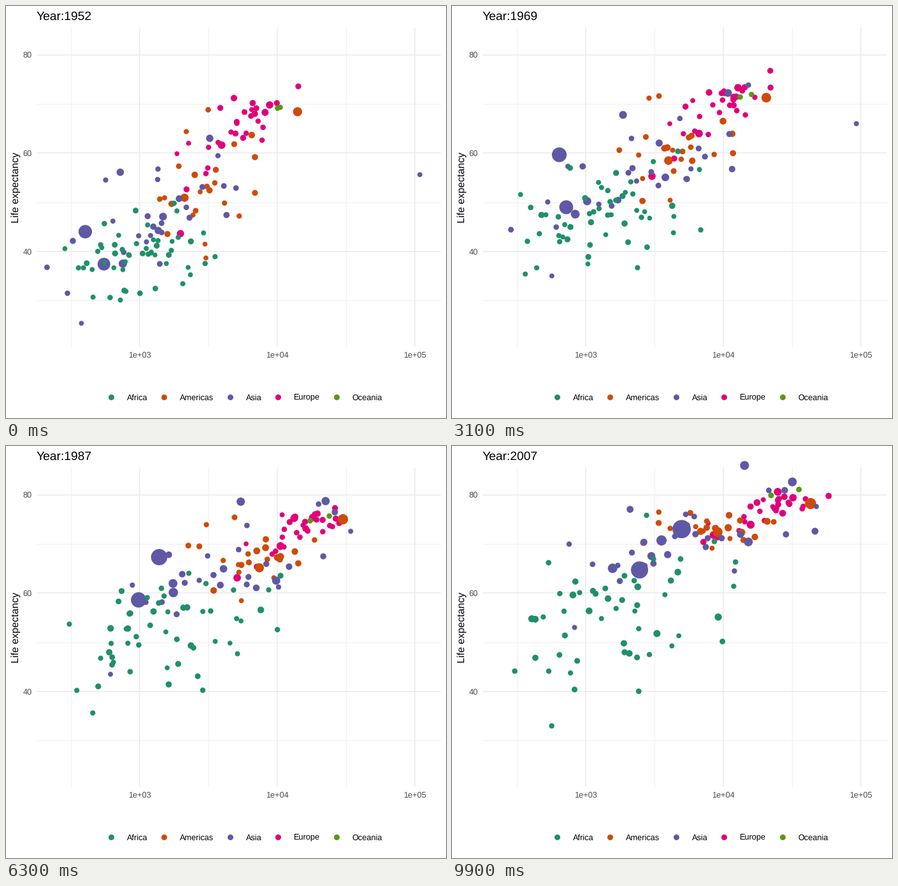
These frames come from a looping animation (691 px wide and 648 px high, 10 s). A matplotlib script:

```python
import numpy as np
import matplotlib.pyplot as plt
from matplotlib.animation import FuncAnimation

W, H, DPI = 691, 648, 64
FRAMES = 100
LEFT, RIGHT, TOP, BOTTOM = 48, 683.5, 34, 536
YEARS = np.linspace(1952, 2007, FRAMES)
SURVEYS = np.arange(1952, 2008, 5)

COLORS = {"Africa": "#1f9067", "Americas": "#ce4b08", "Asia": "#5f58a5",
          "Europe": "#e0007a", "Oceania": "#549a13"}
GROWTH = {"Africa": 3.4, "Americas": 2.1, "Asia": 2.4,
          "Europe": 1.35, "Oceania": 2.2}

plt.rcParams["font.family"] = "Liberation Sans"
plt.rcParams["text.hinting"] = "none"
rng = np.random.default_rng(7)
xs, ys, radii, fills = [], [], [], []


def px(n):
    return n * 72 / DPI


def sx(log_gdp):
    return 210.4 + 216 * (np.asarray(log_gdp) - 3)


def sy(life):
    return 695.2 - 7.7325 * np.asarray(life)


def add(name, pop, years, log_gdp, life):
    """Add a dot moving straight between its yearly positions; pop in millions."""
    xs.append(np.interp(YEARS, years, sx(log_gdp)))
    ys.append(np.interp(YEARS, years, sy(life)))
    people = pop * GROWTH[name] ** ((YEARS - 2007) / 55)
    radii.append(3.6 + 10.8 * np.sqrt(people / 1318))
    fills.append(COLORS[name])


def landmark(name, pop, *points):
    years, gdp, life = zip(*points)
    add(name, pop, years, np.log10(gdp), life)


def trend(start, mid, end):
    """Parabola through three evenly spaced values, at the survey years."""
    u = (SURVEYS - 1952) / 55
    return np.polyval(np.polyfit([0, 0.5, 1], [start, mid, end], 2), u)


def wander(n, keep=0.97):
    """Standard scores of n dots that drift slowly from survey to survey."""
    z = rng.standard_normal(n)
    z = np.clip((z - z.mean()) / z.std(), -2.1, 2.1)
    steps = [z]
    for _ in SURVEYS[1:]:
        z = keep * z + np.sqrt(1 - keep ** 2) * rng.standard_normal(n)
        steps.append(z)
    return np.clip(steps, -2.3, 2.3).T


def crowd(name, n, gdp, gdp_sd, life, life_sd, tie, pop, pop_max):
    """Scatter n dots about a regional trend; tie links wealth and lifespan."""
    wealth, luck = wander(n), wander(n)
    health = tie * wealth + np.sqrt(1 - tie ** 2) * luck
    log_gdp = trend(*gdp) + np.linspace(*gdp_sd, len(SURVEYS)) * wealth
    years = trend(*life) + np.linspace(*life_sd, len(SURVEYS)) * health
    pops = np.minimum(pop * np.exp(1.1 * rng.standard_normal(n)), pop_max)
    for p, g, l in zip(pops, log_gdp, years):
        add(name, p, SURVEYS, g, l)


# Later regions are painted over earlier ones
crowd("Europe", 29, (3.71, 4.13, 4.36), (0.21, 0.22),
      (65.1, 72.7, 77.7), (4.7, 2.7), 0.75, 9, 82)
landmark("Europe", 71, (1952, 1969, 43.6), (1967, 2827, 54.3),
         (1987, 5089, 63.1), (2007, 8458, 71.8))

crowd("Americas", 23, (3.48, 3.77, 3.91), (0.2, 0.22),
      (53, 65.5, 73.3), (8.5, 2.8), 0.5, 9, 108)
landmark("Americas", 190, (1952, 2109, 50.9), (1967, 3430, 57.6),
         (1977, 6660, 61.5), (2007, 9066, 72.4))
landmark("Americas", 301, (1952, 13990, 68.4), (1967, 19530, 70.8),
         (1987, 29884, 75), (2007, 42952, 78.2))

crowd("Asia", 28, (3.08, 3.5, 3.7), (0.36, 0.48),
      (46.2, 61.3, 70.6), (8.3, 6.5), 0.65, 18, 169)
landmark("Asia", 1318, (1952, 400, 44), (1957, 576, 50.5), (1962, 488, 44.5),
         (1967, 613, 58.4), (1977, 741, 64), (1987, 1379, 67.3),
         (2002, 3119, 72), (2007, 4959, 73))
landmark("Asia", 1110, (1952, 547, 37.4), (1977, 813, 54.2),
         (1987, 977, 58.6), (2007, 2452, 64.7))
landmark("Asia", 223, (1952, 750, 37.5), (1967, 762, 46),
         (1987, 1748, 60.1), (2007, 3541, 70.7))
landmark("Asia", 127, (1952, 3217, 63), (1967, 9848, 71.4),
         (1987, 22376, 78.7), (2007, 31656, 82.6))
landmark("Asia", 2.5, (1952, 108382, 55.6), (1967, 80895, 64.6),
         (1972, 109348, 67.7), (1982, 31354, 71.3), (2007, 47307, 77.6))

crowd("Africa", 51, (3, 3.18, 3.22), (0.26, 0.41),
      (39.1, 51.3, 54.9), (4.9, 9), 0.4, 9, 135)
landmark("Africa", 9, (1952, 493, 40), (1987, 848, 44),
         (1992, 737, 23.6), (2007, 863, 46.2))

crowd("Oceania", 2, (4.01, 4.25, 4.47), (0.01, 0.07),
      (69.2, 73.6, 80.7), (0.2, 0.6), 0.9, 9, 20)

xs, ys = np.array(xs), np.array(ys)
sizes = px(2 * np.array(radii)) ** 2

fig = plt.figure(figsize=(W / DPI, H / DPI), dpi=DPI, facecolor="white")
ax = fig.add_axes([0, 0, 1, 1])
ax.set_xlim(0, W)
ax.set_ylim(H, 0)
ax.axis("off")


def grid(decades, lives, width):
    style = dict(color="#ebebeb", linewidth=px(width), zorder=1)
    ax.vlines(sx(decades), TOP, BOTTOM, **style)
    ax.hlines(sy(lives), LEFT, RIGHT, **style)


def text(x, y, s, size, color="black", **kw):
    return ax.text(x, y, s, fontsize=px(size), color=color, va="baseline", **kw)


grid([2.5, 3.5, 4.5], [30, 50, 70], 0.8)
grid([3, 4, 5], [40, 60, 80], 1.55)

for e in (3, 4, 5):
    text(sx(e) - 0.5, 553.3, f"1e+0{e}", 12.8, "#4d4d4d", ha="center")
for v in (40, 60, 80):
    text(41, sy(v) + 4.6, str(v), 12.8, "#4d4d4d", ha="right")
text(19.5, 285.5, "Life expectancy", 16, ha="center", rotation=90,
     rotation_mode="anchor")
title = text(48, 22, "", 19.2)

for (name, color), x in zip(COLORS.items(), (164.8, 247.9, 351.6, 426.9, 518.6)):
    ax.scatter(x, 615, s=px(9) ** 2, color=color, linewidths=0)
    text(x + 25.2, 619.6, name, 12.8)

dots = ax.scatter(xs[:, 0], ys[:, 0], s=sizes[:, 0], c=fills, linewidths=0, zorder=3)


def draw(i):
    dots.set_offsets(np.column_stack([xs[:, i], ys[:, i]]))
    dots.set_sizes(sizes[:, i], DPI)
    title.set_text(f"Year:{round(YEARS[i])}")
    return dots, title


anim = FuncAnimation(fig, draw, frames=FRAMES, interval=100, repeat=True)
plt.show()
```
